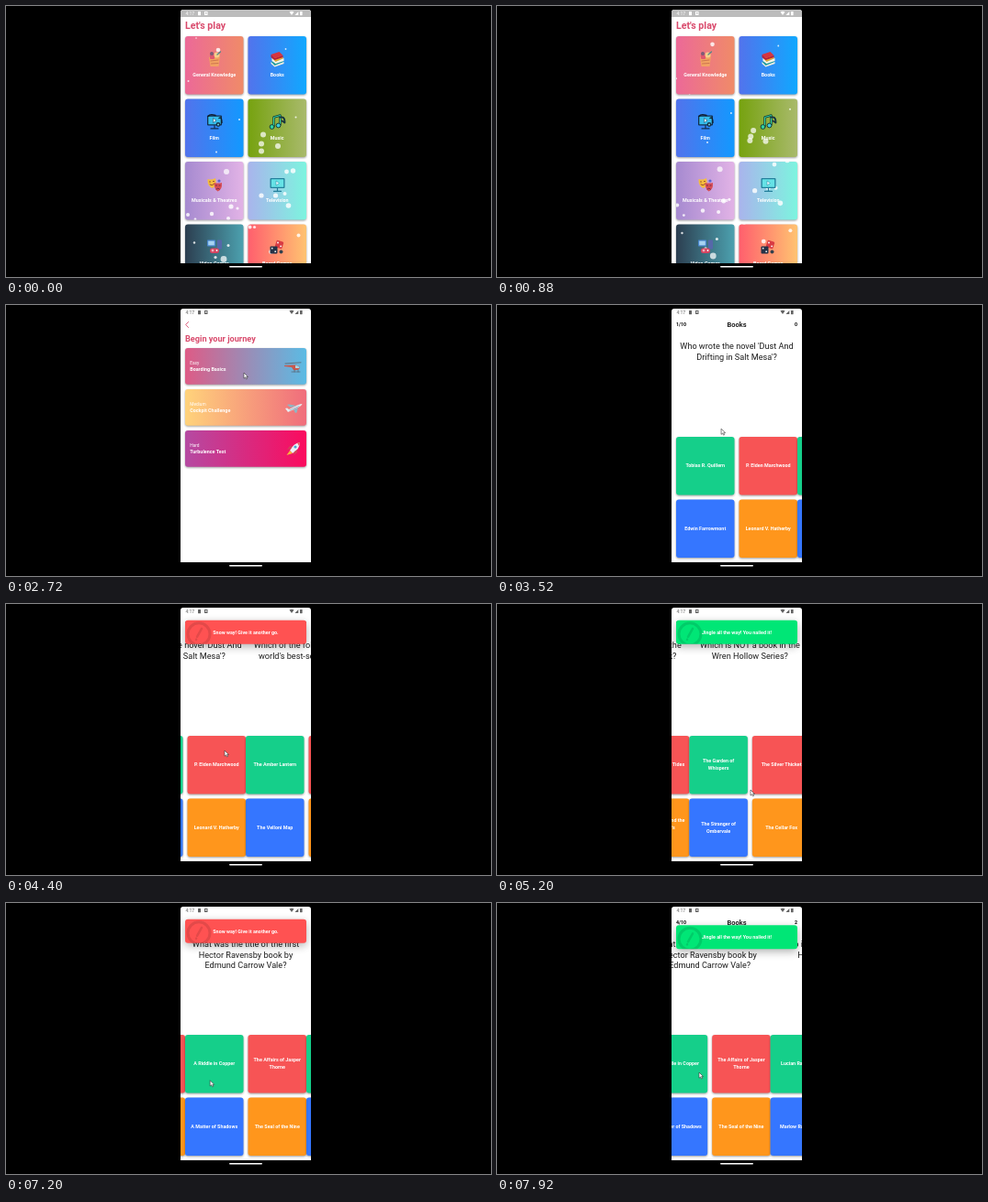
An HTML page that plays this animation: 528x296 px, repeating every 8000 ms.

```html
<!DOCTYPE html>
<html lang="en">
<head>
<meta charset="utf-8">
<title>Quiz app</title>
<style>
  html, body { margin: 0; width: 100%; height: 100%; overflow: hidden; background: #000; }
  svg { display: block; }
  text { font-family: Roboto, "Open Sans", Arial, sans-serif; }
  .label { font-size: 5.4px; font-weight: 700; fill: #fff; }
  .mid { text-anchor: middle; }
  .title { font-weight: 700; fill: #d94a6c; }
  .question { font-size: 9.15px; fill: #1c1c1c; }
</style>
</head>
<body>
<svg id="stage" width="528" height="296" viewBox="0 0 528 296"></svg>
<script>
const LOOP = 8000, STEP = 80;
const TILE = 63.5, PITCH = 68.5, PAGE = 132;
const RED = '#f75455', GREEN = '#15cf8a', BLUE = '#3576ff', ORANGE = '#ff961c';

let defs = '';
let gradientCount = 0;

function gradient(from, to) {
  const id = 'grad' + gradientCount++;
  defs += `<linearGradient id="${id}"><stop stop-color="${from}"/><stop offset="1" stop-color="${to}"/></linearGradient>`;
  return `url(#${id})`;
}
const rect = (x, y, w, h, fill, rx = 0, extra = '') =>
  `<rect x="${x}" y="${y}" width="${w}" height="${h}" rx="${rx}" fill="${fill}" ${extra}/>`;
const circle = (x, y, r, fill, extra = '') =>
  `<circle cx="${x}" cy="${y}" r="${r}" fill="${fill}" ${extra}/>`;
const path = (d, fill, extra = '') => `<path d="${d}" fill="${fill}" ${extra}/>`;
const line = (d, color, width) =>
  path(d, 'none', `stroke="${color}" stroke-width="${width}" stroke-linecap="round" stroke-linejoin="round"`);
const text = (x, y, str, cls, extra = '') =>
  `<text x="${x}" y="${y}" class="${cls}" ${extra}>${str.replace(/&/g, '&amp;')}</text>`;
const group = (x, y, body, extra = '') => `<g transform="translate(${x} ${y})" ${extra}>${body}</g>`;
const panel = (w, h, fill) =>
  rect(0, 1, w, h, '#000', 3, 'opacity=".38" filter="url(#soft)"') + rect(0, 0, w, h, fill, 3);

// Icons, each centred on 0,0
const screen = (frame, face) =>
  rect(-8, -7, 16, 11, frame, 1) + rect(-6.7, -5.7, 13.4, 8.4, face, .5) +
  path('M-1.5 -4L2 -1.5L-1.5 1Z', '#e9fbff', `stroke="${frame}" stroke-width=".5"`) +
  line('M0 4V7M-4 7.4H4', frame, 1.2);
const icons = {
  basket: path('M-6 -2L6 -4L4.500 8H-4.500Z', '#f3a262') + rect(-5, -6, 5, 6, '#e0576d', 1) +
    circle(2.5, -4.5, 3, '#f6d08b') + circle(-3, -6, 2, '#7b5d77') +
    line('M-4 2L4 1M-3.500 5L4 4.500', '#c96f4d', .9) + line('M3 -5L6.500 -8', '#52898a', 1.3),
  books: path('M-7 3L3 0L7 3L-3 7.500Z', '#1b9c9f') + path('M-7 3V5L-3 8.500L7 5V3L-3 7Z', '#f1efe2') +
    path('M-6 -1L3 -4L7 -1L-2 3Z', '#e9a72f') + path('M-6 -1V2L-2 5L7 2V-1L-2 3Z', '#f7f3e8') +
    path('M-7 -5L2 -8L6 -4L-3 -1Z', '#d8343e') + path('M-7 -5V-2L-3 1L6 -2V-4L-3 -1Z', '#b81f38'),
  film: screen('#122f4e', '#35bdea') + line('M-7 -6Q-5 -9 1 -7M5 -4Q8 -6 8 1', '#10202f', 1.4) +
    circle(4, 3, 2.4, '#173247') + circle(4, 3, .9, '#7ae1ee'),
  music: line('M-4 5V-5L3 -7V3', '#143d39', 2.4) + line('M-4 5V-5L3 -7V3', '#30d3a2', 1) +
    circle(-6, 5.5, 2.4, '#30d3a2', 'stroke="#143d39"') + circle(1, 4, 2.4, '#3dc9d6', 'stroke="#143d39"') +
    line('M3 -5Q8 -6 8 0M5 -1L8 1', '#17343f', 1.8),
  masks: group(-3, -2, path('M-4.500 -4Q0 -2.500 4 -5Q6 3 1 6Q-5 4 -4.500 -4Z', '#f5bd3d') +
      line('M-2.500 -1H-1.500M1.500 -1.500H2.500M-2 2Q0 4 2.500 1.500', '#8a4232', .9)) +
    group(3.5, 2, path('M-4 -4Q1 -3 4.500 -4Q5 4 0 5.500Q-4 3 -4 -4Z', '#d74d56') +
      line('M-2 -1H-1M1.500 -1H2.500M-1.500 3Q.5 1 2 3', '#652848', .9)) + circle(5, -4, 1.6, '#5a67d3'),
  tv: screen('#237f9b', '#65e2e6'),
  games: rect(-8, -8, 9, 7, '#4a86cf', .8) + rect(-6.8, -6.8, 6.6, 4.6, '#a6d3f2') +
    rect(3, -8, 5, 10, '#5668a9', .8) + rect(-5, 1, 10, 5.5, '#d84561', 2.5) +
    line('M-3 3.500H-1M-2 2.500V4.500', '#fff', .7) + circle(2.5, 3.5, .9, '#fff'),
  dice: group(2, -3, rect(-4, -4, 8, 8, '#d93b43', 1.4, 'transform="rotate(18)"') +
      circle(-1.5, -2, .9, '#fff') + circle(1.7, 1.9, .9, '#fff')) +
    rect(-8, -1, 8, 8, '#263247', 1) + circle(-5.8, 1.2, .9, '#eee') + circle(-2.3, 4.7, .9, '#eee') +
    circle(4, 5, 2, '#33414d'),
  copter: line('M-9 -3L8 -4.200', '#59636d', .8) + path('M-10 -1L0 -1.500Q6 -2 7 2Q5 5 0 4L-2 1L-10 0Z', '#c9574c') +
    path('M2 -1Q6 -1 6.500 2H2Z', '#a9d7e4') + line('M-2 6H7M1 4V6M5 4V6', '#56606d', .7),
  plane: path('M-9 1L-7 .5L-5 2L4 -2.500Q8 -4.500 9.500 -4Q9 -2 5 0L-6 5Z', '#e8edf0') +
    path('M-3 0L-7 -3L-5 -3.500L3 -2ZM0 2L2 6L3.500 5.500L5 0Z', '#8fb6c4') + line('M-4 3L6 -1.500', '#6f98b2', .6),
  rocket: path('M-4 2Q0 -6 7 -7Q7 0 -1 5Z', '#edf0f5') + path('M4 -6.500Q7 -7 7 -7Q7 -5 6 -3Z', '#e95158') +
    circle(2, -2, 1.6, '#4ba8d6') + path('M-3 0L-7 1L-4 -3L-1 -3ZM1 3L0 7L4 4L4 1Z', '#d24359') +
    path('M-4 2L-7.500 7L-1 5Z', '#f8b53c')
};

// name, icon, colours, bubbles as [x, y, r]
const topics = [
  ['General Knowledge', 'basket', '#ec6998', '#f08b68', [[3.5, 49, 1], [36, 15, 2.3], [12, 2, .8]]],
  ['Books', 'books', '#5273ec', '#10a8ff', [[41, 14, .9]]],
  ['Film', 'film', '#5273ec', '#1299ff', [[59, 22.5, 1], [34, 58, 1]]],
  ['Music', 'music', '#76a20f', '#a9ba6c', [[16.5, 39, 3], [14.5, 49, 3], [14.5, 57, 3], [32.5, 51.5, 3], [52, 20, 1]]],
  ['Musicals & Theatres', 'masks', '#a68ad0', '#e2b3e6',
    [[45, 11, 3], [50, 49, 2.6], [57, 51, 1.6], [29, 57, 2.2], [47, 62, 2], [3, 58, 2], [11, 63, 1.4]]],
  ['Television', 'tv', '#a9b4ec', '#7df4df',
    [[42, 11, 2.4], [49, 10, 2.7], [14.5, 37, 2.6], [30, 37, 2.6], [44, 48, 2.8], [40, 35, 2]]],
  ['Video Games', 'games', '#2c3e50', '#4ca1af', [[33, 36, 1.6], [42, 38, 3.4], [47, 23, 1.5], [10, 20, 1.2]]],
  ['Board Games', 'dice', '#ff5f6d', '#ffc371', [[2, 3, 2], [7, 3, 1.6], [25, 30, 2.4], [55, 12, 2]]]
];

const levels = [
  ['Easy', 'Boarding Basics', 'copter', '#de5b86', '#5bbbe4'],
  ['Medium', 'Cockpit Challenge', 'plane', '#ffd37b', '#f06d7c'],
  ['Hard', 'Turbulence Test', 'rocket', '#b54aa2', '#fb0b5e']
];

// Answers run green, red, blue, orange; | breaks a line
const quiz = [
  ["Who wrote the novel 'Dust And|Drifting in Salt Mesa'?",
    'Tobias R. Quillern', 'P. Elden Marchwood', 'Edwin Farrowmont', 'Leonard V. Hatherby'],
  ["Which of the following is the|world's best-selling book?",
    'The Amber Lantern', 'The Song of the Tides', 'The Velloni Map', "Robin Thackle and the|Clockmaker's|Lamp"],
  ['Which is NOT a book in the|Wren Hollow Series?',
    'The Garden of|Whispers', 'The Silver Thicket', 'The Stranger of|Ombervale', 'The Cellar Fox'],
  ['What was the title of the first|Hector Ravensby book by|Edmund Carrow Vale?',
    'A Riddle in Copper', 'The Affairs of Jasper|Thorne', 'A Matter of Shadows', 'The Seal of the Nine'],
  ['Who is the elder brother of|Hector Ravensby?',
    'Lucian Ravensby', 'Oswin Ravensby', 'Marlow Ravensby', 'Alban Ravensby']
];

// When each answer slides the pages and pops its banner
const answers = [
  { slide: 4220, pop: 4220, right: false },
  { slide: 4924, pop: 4900, right: true },
  { slide: 6321, pop: 6348, right: false },
  { slide: 7800, pop: 7800, right: true }
];
const openLevels = 1620, openQuiz = 2840;

const pointer = [
  [900, 300, 275], [1450, 281, 83], [1700, 281, 83], [2500, 259, 74], [2900, 259, 74],
  [3900, 238, 160], [4420, 238, 160], [4850, 276, 203], [5220, 276, 203],
  [6200, 232, 234], [6500, 232, 234], [7500, 220, 185], [8000, 220, 185]
];

function lines(x, y, str, gap, cls, centred) {
  const parts = str.split('|');
  const top = centred ? y - (parts.length - 1) * gap / 2 : y;
  return parts.map((s, i) => text(x, top + i * gap, s, cls + ' mid')).join('');
}

const pageBack = rect(190, 4, 142, 277, '#fff');

function homePage() {
  const tiles = topics.map(([name, icon, from, to, dots], i) => {
    const bubbles = dots.map(([x, y, r]) =>
      circle(x, y, r, '#fff', `class="bubble" opacity="${r > 2.9 ? .72 : .82}"`)).join('');
    return group(195 + (i % 2) * PITCH, 33 + (i >> 1) * PITCH,
      panel(TILE, TILE, gradient(from, to)) +
      `<g clip-path="url(#tile)">${bubbles}</g>` + group(32, 25, icons[icon]) +
      text(TILE / 2, 44.4, name, 'label mid'));
  }).join('');
  return pageBack + text(195, 24.8, "Let's play", 'title', 'font-size="10.6"') + tiles;
}

function levelPage() {
  const cards = levels.map(([grade, name, icon, from, to], i) => group(195, 47 + i * 45,
    panel(PAGE, 39.7, gradient(from, to)) +
    text(5.2, 18, grade, 'label', 'style="font-weight:400;font-size:4.8px"') +
    text(5.2, 25.3, name, 'label') + group(118, 20, icons[icon]))).join('');
  return pageBack + line('M198.500 18.500L195.700 21.500L198.500 24.500', '#d94a6c', .9) +
    text(195, 39.5, 'Begin your journey', 'title', 'font-size="9.15"') + cards;
}

function quizPage() {
  const colors = [GREEN, RED, BLUE, ORANGE];
  const pages = quiz.map(([ask, ...options], n) => group(n * PAGE, 0,
    lines(261, 48, ask, 11.6, 'question') +
    options.map((s, i) => group(195 + (i % 2) * PITCH, 144 + (i >> 1) * PITCH,
      panel(TILE, TILE, colors[i]) + lines(TILE / 2, 33.2, s, 8, 'label', true))).join(''))).join('');
  return pageBack +
    text(195, 23, '', '', 'id="count" font-size="5.3" font-weight="700"') +
    text(261, 23.6, 'Books', 'mid', 'font-size="7.5" font-weight="500"') +
    text(327, 23, '', '', 'id="score" font-size="5.3" font-weight="700" text-anchor="end"') +
    `<g id="pages">${pages}</g>`;
}

function banner() {
  return rect(0, 3, PAGE, 26, '#000', 3, 'opacity=".3" filter="url(#wide)"') +
    rect(0, 0, PAGE, 26, RED, 3, 'id="bannerFill"') +
    `<g clip-path="url(#strip)" opacity=".11">${circle(15, 15, 12, 'none', 'stroke="#000" stroke-width="3"')}
     ${line('M13 18L18 9M12 21L12.100 20.900', '#000', 2.5)}</g>` +
    text(66, 15, '', 'label mid', 'id="bannerText"');
}

const statusIcons =
  text(195.5, 10, '4:17', '', 'font-size="5"') +
  rect(209, 6, 3, 4.2, 'inherit', .5).replace('fill="inherit"', '') +
  path('M216 6H219.500V10H216ZM217 7V8.500H218.500V7Z', 'currentColor', 'fill-rule="evenodd"') +
  path('M308.500 6.500Q311 5 313.500 6.500L311 10Z', 'currentColor') +
  path('M314.500 10H318.300V6Z', 'currentColor') + rect(320, 6, 2.6, 4.2, 'currentColor', .4);

const homeBody = homePage(), levelBody = levelPage(), quizBody = quizPage();
const stage = document.getElementById('stage');
stage.innerHTML = `<defs>${defs}
  <filter id="soft" x="-10%" y="-10%" width="120%" height="125%"><feGaussianBlur stdDeviation="1"/></filter>
  <filter id="wide" x="-20%" y="-80%" width="140%" height="260%"><feGaussianBlur stdDeviation="5"/></filter>
  <clipPath id="tile">${rect(0, 0, TILE, TILE, '#000', 3)}</clipPath>
  <clipPath id="strip">${rect(0, 0, PAGE, 26, '#000', 3)}</clipPath>
  <clipPath id="phone"><path d="M190 281V7Q190 4 193 4H329Q332 4 332 7V281Z"/></clipPath></defs>
  ${rect(0, 0, 528, 296, '#000')}
  <g clip-path="url(#phone)">
    <g id="home">${homeBody}</g><g id="levels">${levelBody}</g><g id="quiz">${quizBody}</g>
    ${rect(190, 4, 142, 8, '#bcbcbc', 0, 'id="bar"')}
    <g id="status">${statusIcons}</g>
    <g id="banner">${banner()}</g>
    <g id="cursor">${path('M0 0V6.200L1.500 4.900L2.600 7L3.600 6.500L2.600 4.500H4.500Z', '#fff', 'stroke="#333" stroke-width=".6"')}</g>
  </g>
  ${rect(243, 284, 36, 1.6, '#fff', .8)}`;

const el = id => document.getElementById(id);
const set = (id, name, value) => el(id).setAttribute(name, value);
const show = (id, on) => set(id, 'display', on ? 'inline' : 'none');
const clamp = u => Math.max(0, Math.min(1, u));
const easeOut = u => 1 - (1 - u) ** 2;
const easeInOut = u => u < .5 ? 2 * u * u : 1 - 2 * (1 - u) ** 2;
const elasticOut = u => u >= 1 ? 1 : 1 + 2 ** (-10 * u) * Math.sin((u - .1) * Math.PI * 5);
const zoom = s => `translate(261 142.5) scale(${s}) translate(-261 -142.5)`;

const bubbles = [...stage.querySelectorAll('.bubble')].map((node, i) => ({
  node, x: +node.getAttribute('cx'), y: +node.getAttribute('cy'),
  speed: 3 + (i * 37 % 11), sway: (i * 53 % 9) - 4
}));

function drawPages(t) {
  const a = easeOut(clamp((t - openLevels) / 180));
  const b = easeOut(clamp((t - openQuiz) / 180));
  show('home', a < 1);
  show('levels', a > 0 && b < 1);
  show('quiz', b > 0);
  set('home', 'transform', zoom(1 + .05 * a));
  set('levels', 'transform', zoom(b > 0 ? 1 + .05 * b : .85 + .15 * a));
  set('levels', 'opacity', Math.min(1, a * 1.3));
  set('quiz', 'transform', zoom(.85 + .15 * b));
  set('quiz', 'opacity', Math.min(1, b * 1.3));
  set('bar', 'opacity', 1 - a);
  const ink = a < .7 ? '#fff' : '#626262';
  set('status', 'fill', ink);
  set('status', 'color', ink);
}

function drawBubbles(t) {
  const s = t / 1000, span = TILE + 8;
  for (const b of bubbles) {
    b.node.setAttribute('cx', b.x + b.sway * s);
    b.node.setAttribute('cy', ((b.y + 4 - b.speed * s) % span + span) % span - 4);
  }
}

function drawQuiz(t) {
  let moved = 0, score = 0, last = null;
  for (const a of answers) {
    moved += easeInOut(clamp((t - a.slide) / 360));
    if (t >= a.pop) {
      last = a;
      if (a.right) score++;
    }
  }
  set('pages', 'transform', `translate(${-moved * PAGE} 0)`);
  el('count').textContent = Math.floor(moved + .5) + 1 + '/10';
  el('score').textContent = score;
  show('banner', last);
  if (!last) return;
  const y = 17.8 + 26 * (elasticOut((t - last.pop) / 600) - 1);
  set('banner', 'transform', `translate(195 ${y})`);
  set('bannerFill', 'fill', last.right ? '#00e676' : '#ff5252');
  el('bannerText').textContent = last.right ? 'Jingle all the way! You nailed it!' : 'Snow way! Give it another go.';
}

function drawCursor(t) {
  show('cursor', t >= pointer[0][0]);
  const i = pointer.findIndex(p => p[0] > t);
  if (i < 1) return;
  const [t0, x0, y0] = pointer[i - 1], [t1, x1, y1] = pointer[i];
  const u = easeInOut((t - t0) / (t1 - t0));
  set('cursor', 'transform', `translate(${x0 + (x1 - x0) * u} ${y0 + (y1 - y0) * u})`);
}

function draw(now) {
  const t = Math.floor(now % LOOP / STEP) * STEP;
  drawPages(t);
  drawBubbles(t);
  drawQuiz(t);
  drawCursor(t);
}

function tick() {
  draw(performance.now());
  requestAnimationFrame(tick);
}
tick();
</script>
</body>
</html>
```
